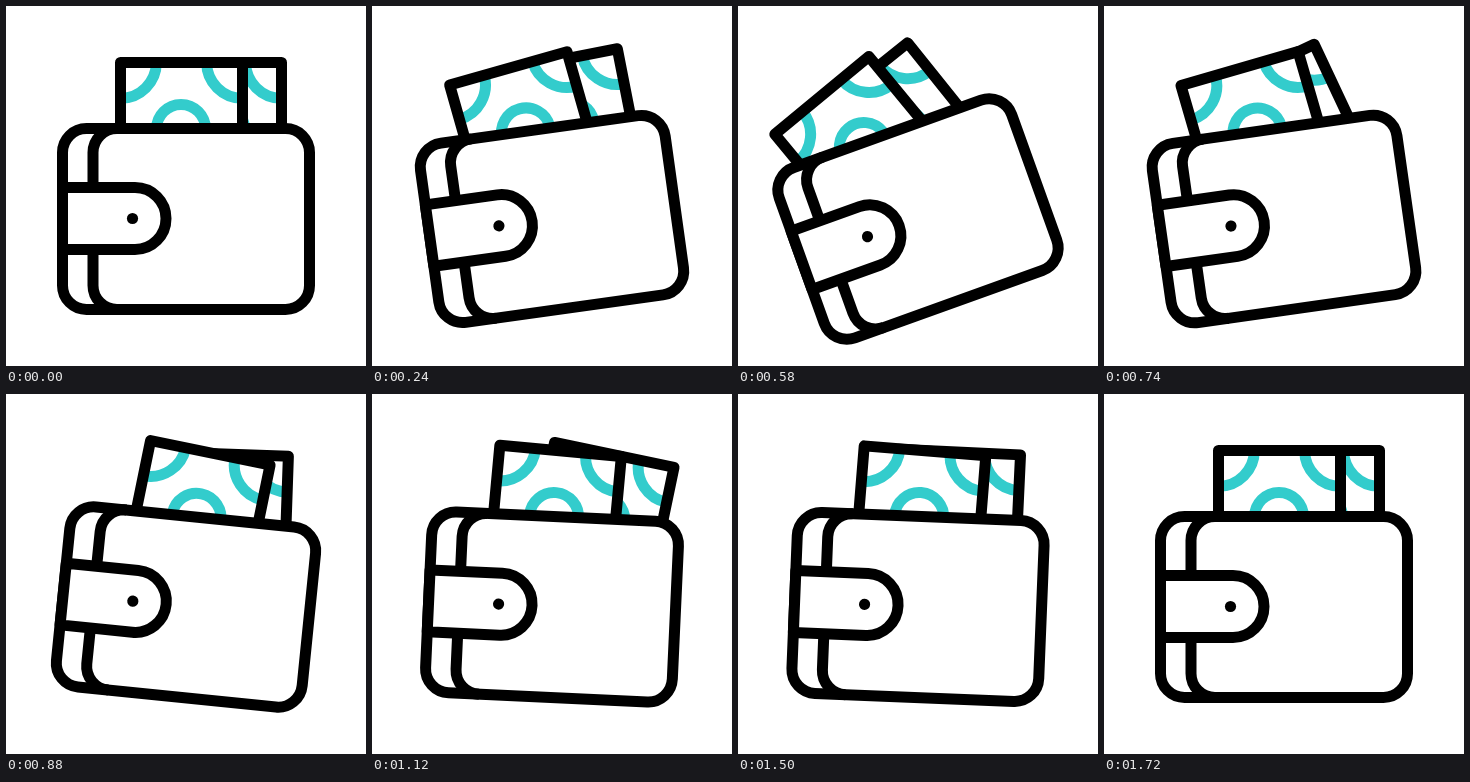
These frames come from a looping animation (360 px wide and 360 px high, 2000 ms). An HTML page:

```html
<!DOCTYPE html>
<html lang="en">
<head>
<meta charset="utf-8">
<title>Wallet</title>
<style>
  html, body { margin: 0; width: 100%; height: 100%; overflow: hidden; background: #fff; }
  svg { display: block; width: 100%; height: 100%; }
  .ink { fill: #fff; stroke: #000; stroke-width: 11; stroke-linejoin: round; }
  .line { fill: none; }
  .mark { fill: none; stroke: #3cc; stroke-width: 11; }
</style>
</head>
<body>
<svg viewBox="0 0 360 360">
  <defs>
    <clipPath id="paper"><rect x="114.5" y="56.5" width="122" height="134"/></clipPath>
    <g id="bill">
      <rect x="114.5" y="56.5" width="122" height="134" fill="#fff"/>
      <g class="mark" clip-path="url(#paper)">
        <circle cx="114.5" cy="56.5" r="35.8"/>
        <circle cx="236.5" cy="56.5" r="35.8"/>
        <circle cx="175" cy="123" r="24.5"/>
      </g>
      <rect class="ink line" x="114.5" y="56.5" width="122" height="134"/>
    </g>
  </defs>
  <g id="wallet">
    <g transform="translate(39 0)"><use id="back" href="#bill"/></g>
    <use id="front" href="#bill"/>
    <rect class="ink" x="56.5" y="122.5" width="247" height="181" rx="24"/>
    <path class="ink line" d="M111 122.5A24 24 0 0 0 87 146.5V279.5A24 24 0 0 0 111 303.5"/>
    <path class="ink" d="M56.5 181.5H129A31 31 0 0 1 129 243.5H56.5Z"/>
    <circle cx="126.5" cy="212.5" r="5.6"/>
  </g>
</svg>
<script>
  const LOOP = 2000;
  const LAG = 100; // the rear bill trails the swing
  // [time in ms, angle in degrees]
  const SWING = [[0, 0], [560, -20], [980, 10], [1265, -5], [1475, 2.5], [1625, 0]];
  const [wallet, back, front] = ['wallet', 'back', 'front'].map(id => document.getElementById(id));

  const smooth = p => p * p * (3 - 2 * p);

  function swingAt(t) {
    if (t <= 0) return 0;
    const i = SWING.findIndex(([time]) => time > t);
    if (i < 0) return 0;
    const [t0, a0] = SWING[i - 1];
    const [t1, a1] = SWING[i];
    return a0 + (a1 - a0) * smooth((t - t0) / (t1 - t0));
  }

  const turn = (node, angle, x, y) =>
    node.setAttribute('transform', `rotate(${angle.toFixed(3)} ${x} ${y})`);

  function draw(t) {
    const angle = swingAt(t);
    turn(wallet, angle, 180, 213);
    turn(front, angle, 175.5, 187);
    turn(back, swingAt(t - LAG), 175.5, 187);
  }

  const start = performance.now();
  function tick() {
    draw((performance.now() - start) % LOOP);
    requestAnimationFrame(tick);
  }
  tick();
</script>
</body>
</html>
```
